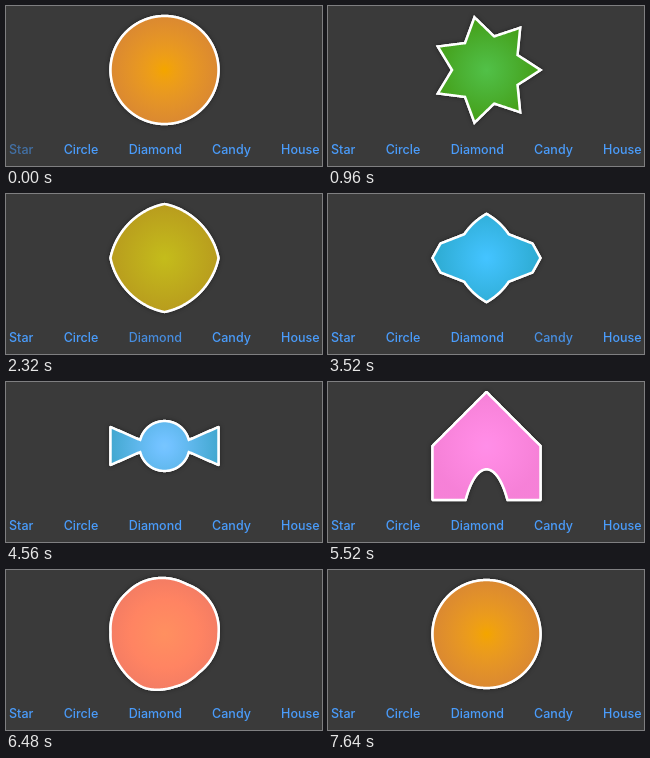
These frames come from a looping animation (316 by 160 pixels, 7.68 s). An HTML page with a canvas:

```html
<!DOCTYPE html>
<html lang="en">
<head>
<meta charset="utf-8">
<title>Shape morphing</title>
<style>
  html, body { margin: 0; height: 100%; overflow: hidden; background: #3a3a3a; }
  canvas { display: block; }
</style>
</head>
<body>
<canvas width="316" height="160"></canvas>
<script>
const ctx = document.querySelector('canvas').getContext('2d');
const LOOP = 7680, R = 54, N = 560, TAU = Math.PI * 2;

const polar = (r, deg) => [r * Math.cos(deg * TAU / 360), r * Math.sin(deg * TAU / 360)];
const range = (n, f) => Array.from({ length: n }, (_, i) => f(i));
const mix = (a, b, p) => a.map((v, i) => v + (b[i] - v) * p);

// Spread N points evenly along a closed outline.
function resample(corners) {
  const pts = [...corners, corners[0]];
  const dist = [0];
  for (let i = 1; i < pts.length; i++)
    dist.push(dist[i - 1] + Math.hypot(pts[i][0] - pts[i - 1][0], pts[i][1] - pts[i - 1][1]));
  let k = 0;
  return range(N, i => {
    const d = dist.at(-1) * i / N;
    while (dist[k + 1] <= d) k++;
    return mix(pts[k], pts[k + 1], (d - dist[k]) / (dist[k + 1] - dist[k]));
  });
}

const arc = (r, from, to, n = 30) => range(n + 1, i => polar(r, from + (to - from) * i / n));

const door = range(31, i => {
  const u = i / 30, v = 1 - u, ends = u ** 3 + v ** 3, mids = 3 * u * v;
  return [21 * (v ** 3 - u ** 3) + 30 * u * v * (v - u), 54 * ends + 13 * mids];
});

// Colours are [lightness, chroma, hue] for the middle and the rim.
const shapes = {
  Star: {
    x: 15.2, inner: [.72, .19, 142], rim: [.62, .185, 138],
    pts: range(14, i => polar(i % 2 ? 34.5 : R, i * 180 / 7))
  },
  Circle: {
    x: 75, inner: [.78, .165, 75], rim: [.7, .14, 63],
    pts: range(N, i => polar(R, i * 360 / N))
  },
  Diamond: {
    x: 149.3, inner: [.77, .145, 230], rim: [.69, .12, 222],
    pts: range(4, i => polar(R, i * 90))
  },
  Candy: {
    x: 225.5, inner: [.8, .12, 245], rim: [.69, .11, 228],
    pts: [[R, 0], [R, 19], ...arc(25, 14, 166), [-R, 19], [-R, -19], ...arc(25, 194, 346), [R, -19]]
  },
  House: {
    x: 294.3, inner: [.8, .175, 336], rim: [.76, .175, 338],
    pts: [[R, 0], [R, R], ...door, [-R, R], [-R, 0], [0, -R]]
  }
};
for (const s of Object.values(shapes)) s.pts = resample(s.pts);

const taps = [
  [20, 'Star'], [1180, 'Circle'], [2240, 'Diamond'],
  [3430, 'Candy'], [4625, 'House'], [6220, 'Circle']
];

function spring(ms) {
  const t = 11 * Math.max(0, ms) / 1000, w = Math.sqrt(.75);
  return 1 - Math.exp(-t / 2) * (Math.cos(w * t) + .5 / w * Math.sin(w * t));
}

function blend(a, b, p) {
  const turn = ((b[2] - a[2] + 540) % 360) - 180;
  const [l, c] = mix(a, b, p);
  return `oklch(${l} ${c} ${(a[2] + turn * p + 360) % 360})`;
}

function drawShape(a, b, ms) {
  const p = spring(ms), tint = Math.min(1, Math.max(0, ms / 400));
  ctx.save();
  ctx.translate(158.5, 64);
  ctx.beginPath();
  a.pts.forEach((pt, i) => ctx.lineTo(...mix(pt, b.pts[i], p)));
  ctx.closePath();
  const fill = ctx.createRadialGradient(0, 0, 0, 0, 0, R);
  fill.addColorStop(0, blend(a.inner, b.inner, tint));
  fill.addColorStop(1, blend(a.rim, b.rim, tint));
  ctx.fillStyle = fill;
  ctx.strokeStyle = '#fff';
  ctx.lineWidth = 2.5;
  ctx.shadowColor = 'rgba(0,0,0,.5)';
  ctx.shadowBlur = 4;
  ctx.stroke();
  ctx.shadowColor = 'transparent';
  ctx.fill();
  ctx.stroke();
  ctx.restore();
}

function drawLabels(t) {
  ctx.font = '500 12.5px Inter, sans-serif';
  ctx.textAlign = 'center';
  ctx.fillStyle = '#4a9cfb';
  for (const [name, { x }] of Object.entries(shapes)) {
    const fades = taps.filter(([at, n]) => n === name && t >= at - 20)
      .map(([at]) => .45 * Math.exp((at - 20 - t) / 90));
    ctx.globalAlpha = 1 - Math.max(0, ...fades);
    ctx.fillText(name, x, 148);
  }
  ctx.globalAlpha = 1;
}

function frame(now) {
  const t = now % LOOP;
  const i = Math.max(0, taps.findLastIndex(([at]) => t >= at));
  const [at, name] = taps[i];
  const before = taps.at(i - 1)[1];
  ctx.fillStyle = '#3a3a3a';
  ctx.fillRect(0, 0, 316, 160);
  drawShape(shapes[before], shapes[name], t - at);
  drawLabels(t);
  requestAnimationFrame(frame);
}
frame(performance.now());
</script>
</body>
</html>
```
